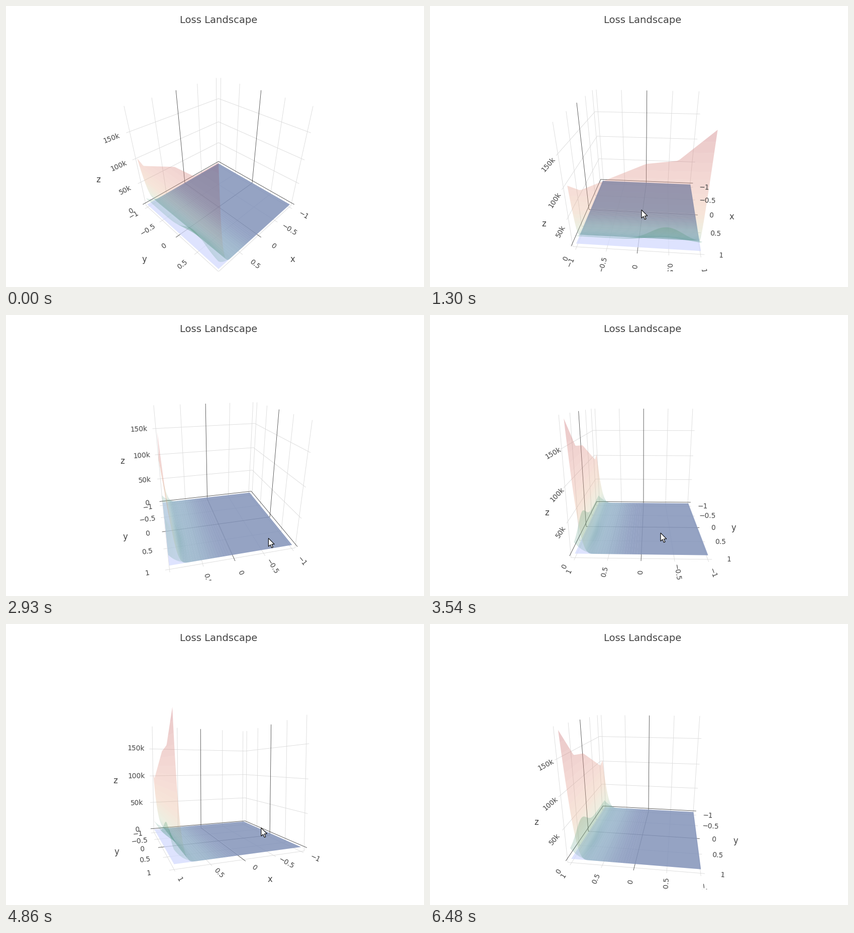
Animation, 832 px wide and 561 px high, one loop 7030 ms. Source, as a matplotlib script:

```python
import numpy as np
import matplotlib.pyplot as plt
from matplotlib.animation import FuncAnimation
from matplotlib.collections import LineCollection, PolyCollection
from matplotlib.patches import Polygon

W, H = 832, 561
FRAMES, STEP = 95, 74
TOP, BOTTOM = 100, 530
CX, CY = 423, (TOP + BOTTOM) / 2
FOCAL = (BOTTOM - TOP) / 2 / np.tan(np.pi / 8)
DIST = 1.25 * np.sqrt(3)
INK = "#444444"
FONT = "DejaVu Sans"

# each turn: start, end, final azimuth and elevation
START = np.array([45, 35.26])
TURNS = [(280, 770, 46, 54), (850, 1290, 4.6, 27), (1610, 2230, 73, 23.5),
         (2380, 2540, 76, 22), (3230, 3480, 91.2, 16), (3600, 3900, 55, -15),
         (3900, 4230, 69, 3.5), (4890, 5170, 54, -4),
         (5490, 5780, 94.2, 17.5), (5840, 5950, 97.4, 18.5)]

ENTER, REGRIP, LEAVE, GONE = (70, 280), (2770, 3230), (5950, 6250), 6440
DRAG = np.array([-2.2, 2.25])  # pointer pixels per degree
ARROW = np.array([(0, 0), (0, 16.5), (3.9, 13), (6.4, 19), (9, 18),
                  (6.5, 12), (11.8, 12)])

Z_LO, Z_SPAN = -6.6, 198.0
TICKS = (-1, -0.5, 0, 0.5, 1)
Z_TICKS = (0, 50, 100, 150)
TICK_GAP, NAME_GAP = 0.12, 0.3


def ease(t, t0, t1):
    u = np.clip((t - t0) / (t1 - t0), 0, 1)
    return u * u * (3 - 2 * u)


def pose(t):
    p = START
    for t0, t1, *goal in TURNS:
        p = p + (np.array(goal) - p) * ease(t, t0, t1)
    return p


def pointer(t):
    first = np.array([421, 407]) + DRAG * (pose(t) - (4.6, 27))
    second = np.array([459, 435]) + DRAG * (pose(t) - (91.2, 16))
    u = ease(t, *REGRIP)
    tip = first + (second - first) * u + np.sin(np.pi * u) * np.array([275, 50])
    tip = tip + (1 - ease(t, *ENTER)) * np.array([310, 90])
    return tip + ease(t, *LEAVE) * np.array([253, 108])


def flat(v):
    return np.asarray(v) / 2.125


def height(z):
    return (np.asarray(z) - Z_LO) / Z_SPAN - 0.5


class View:
    def __init__(self, azimuth, elevation):
        a, e = np.radians([azimuth, elevation])
        self.ca, self.sa = np.cos(a), np.sin(a)
        ce, se = np.cos(e), np.sin(e)
        self.right = np.array([-self.sa, self.ca, 0])
        self.up = np.array([-se * self.ca, -se * self.sa, ce])
        self.eye = np.array([ce * self.ca, ce * self.sa, se])

    def __call__(self, p):
        p = np.asarray(p, float)
        k = FOCAL / (DIST - p @ self.eye)
        return np.stack([CX + k * (p @ self.right),
                         CY - k * (p @ self.up)], axis=-1)


Y = np.linspace(-1, 1, 61)


def contours(ridge, foot, power, levels):
    """Lines of equal height on a slope rising from x=foot to the ridge at x=1."""
    z = np.minimum(levels[:, None], ridge)
    return foot + (1 - foot) * (z / ridge) ** (1 / power), z


def strips(x, z):
    p = np.stack([flat(x), flat(np.broadcast_to(Y, x.shape)), height(z)], -1)
    return np.concatenate([p[:-1], p[1:, ::-1]], axis=1)


def middle(a):
    return (a[:-1] + a[1:]) / 2


def ramp(v, stops, colors):
    c = np.array(colors, float) / (255, 255, 255, 1)
    return np.stack([np.interp(v, stops, c[:, k]) for k in range(4)], axis=-1)


def loss_surface():
    ridge = np.interp(Y, (-1, -.82, .13, .55, 1), (103, 96.5, 140, 146, 187))
    levels = 187 * np.linspace(1, 0, 31) ** 2.5
    x, z = contours(ridge, 0.7, 4, levels)
    floor = np.r_[np.linspace(0.66, 0.06, 16), -1]
    x = np.vstack([x, np.repeat(floor[:, None], len(Y), axis=1)])
    z = np.vstack([z, np.zeros((len(floor), len(Y)))])
    level = middle(np.r_[levels, 0 * floor])
    color = ramp(level, (0, 8, 25, 60, 110, 187), (
        (110, 155, 165, .50), (150, 190, 180, .36), (195, 205, 160, .30),
        (232, 180, 145, .34), (228, 155, 140, .36), (200, 105, 110, .37)))
    navy = np.array([60 / 255, 85 / 255, 125 / 255, 0.45])
    w = ease(middle(x.mean(axis=1)), 0.06, 0.7)[:, None]
    return strips(x, z), navy + (color - navy) * w


def low_surface():
    ridge = 16 + 25 * np.exp(-((Y - 0.45) / 0.35) ** 2)
    levels = 41 * np.linspace(1, 0, 16) ** 2
    x, z = contours(ridge, 0.6, 3, levels)
    color = ramp(middle(levels), (0, 4, 40), (
        (60, 140, 130, 0), (60, 140, 120, .17), (70, 145, 100, .25)))
    return strips(x, z), color


def base_plane():
    x = np.repeat([[1.0], [-1.0]], len(Y), axis=1)
    return strips(x, 0 * x), np.array([(211 / 255, 218 / 255, 254 / 255, .75)])


PARTS = [base_plane(), loss_surface(), low_surface()]
STRIPS = np.concatenate([p[0] for p in PARTS])
COLORS = np.concatenate([p[1] for p in PARTS])

fig = plt.figure(figsize=(W / 100, H / 100), dpi=100, facecolor="white")


def pixel_axes(y0, y1):
    ax = fig.add_axes([0, 1 - y1 / H, 1, (y1 - y0) / H])
    ax.set(xlim=(0, W), ylim=(y1, y0))
    ax.axis("off")
    return ax


scene = pixel_axes(TOP, BOTTOM)
page = pixel_axes(0, H)

light = LineCollection([], colors="#d9d9d9", linewidths=0.6, zorder=1)
dark = LineCollection([], colors=INK, linewidths=0.6, zorder=1.1)
mesh = PolyCollection(STRIPS[..., :2], facecolors=COLORS, edgecolors="none",
                      linewidths=0, zorder=2)
for c in (light, dark, mesh):
    c.set_snap(False)
    scene.add_collection(c, autolim=False)


def label(s, px):
    return scene.text(0, 0, s, size=px * 0.72, color=INK, family=FONT,
                      ha="center", va="center", rotation_mode="anchor",
                      clip_on=True, zorder=3)


def number(v):
    return f"{v:g}".replace("-", "\u2212")


flat_labels = [[label(number(v), 13.7) for v in TICKS] for _ in "xy"]
z_labels = [label(f"{v}k" if v else "0", 13.7) for v in Z_TICKS]
names = [label(s, 16.5) for s in "xyz"]
page.text(CX, 28, "Loss Landscape", size=19.7 * 0.72, color=INK,
          family=FONT, ha="center", va="center")
arrow = Polygon(ARROW, closed=True, facecolor="white", edgecolor="black",
                linewidth=0.8, zorder=5)
page.add_patch(arrow)


def put(text, view, p, out, gap, turn=True):
    a, b = view([p, np.add(p, np.multiply(out, gap))])
    text.set_position(b)
    if turn:
        dx, dy = b - a
        angle = -np.degrees(np.arctan2(dy, dx))
        text.set_rotation((angle + 90) % 180 - 90)


def draw(i):
    t = (i + 0.5) * STEP
    view = View(*pose(t))
    sx = 1 if view.ca >= 0 else -1
    sy = 1 if view.sa >= 0 else -1
    floor = -0.5 if DIST * view.eye[2] > -0.5 else 0.5
    nx, ny = sx / 2, sy / 2

    thin, bold = [], []
    for v in TICKS:
        f = flat(v)
        group = thin if v else bold
        group += [[(f, -ny, floor), (f, ny, floor)],
                  [(f, -ny, -.5), (f, -ny, .5)],
                  [(-nx, f, floor), (nx, f, floor)],
                  [(-nx, f, -.5), (-nx, f, .5)]]
    for v in Z_TICKS:
        h = height(v)
        group = thin if v else bold
        group += [[(-nx, -ny, h), (nx, -ny, h)],
                  [(-nx, -ny, h), (-nx, ny, h)]]
    light.set_segments(view(thin))
    dark.set_segments(view(bold))
    mesh.set_verts(view(STRIPS))

    out_x, out_y = (0, sy, 0), (sx, 0, 0)
    for v, lx, ly in zip(TICKS, *flat_labels):
        put(lx, view, (flat(v), ny, floor), out_x, TICK_GAP)
        put(ly, view, (nx, flat(v), floor), out_y, TICK_GAP)
    put(names[0], view, (0, ny, floor), out_x, NAME_GAP, False)
    put(names[1], view, (nx, 0, floor), out_y, NAME_GAP, False)

    # the height axis sits on the left silhouette edge
    corners = [((nx, -ny), out_y), ((-nx, ny), out_x)]
    edge, out = min(corners, key=lambda c: np.dot(c[0], view.right[:2]))
    for v, lz in zip(Z_TICKS, z_labels):
        put(lz, view, (*edge, height(v)), out, TICK_GAP)
    put(names[2], view, (*edge, 0), out, NAME_GAP, False)

    arrow.set_visible(ENTER[0] <= t < GONE)
    arrow.set_xy(ARROW + pointer(t))
    return []


anim = FuncAnimation(fig, draw, frames=FRAMES, interval=STEP, repeat=True,
                     repeat_delay=0, init_func=lambda: draw(0), blit=False)
plt.show()
```
